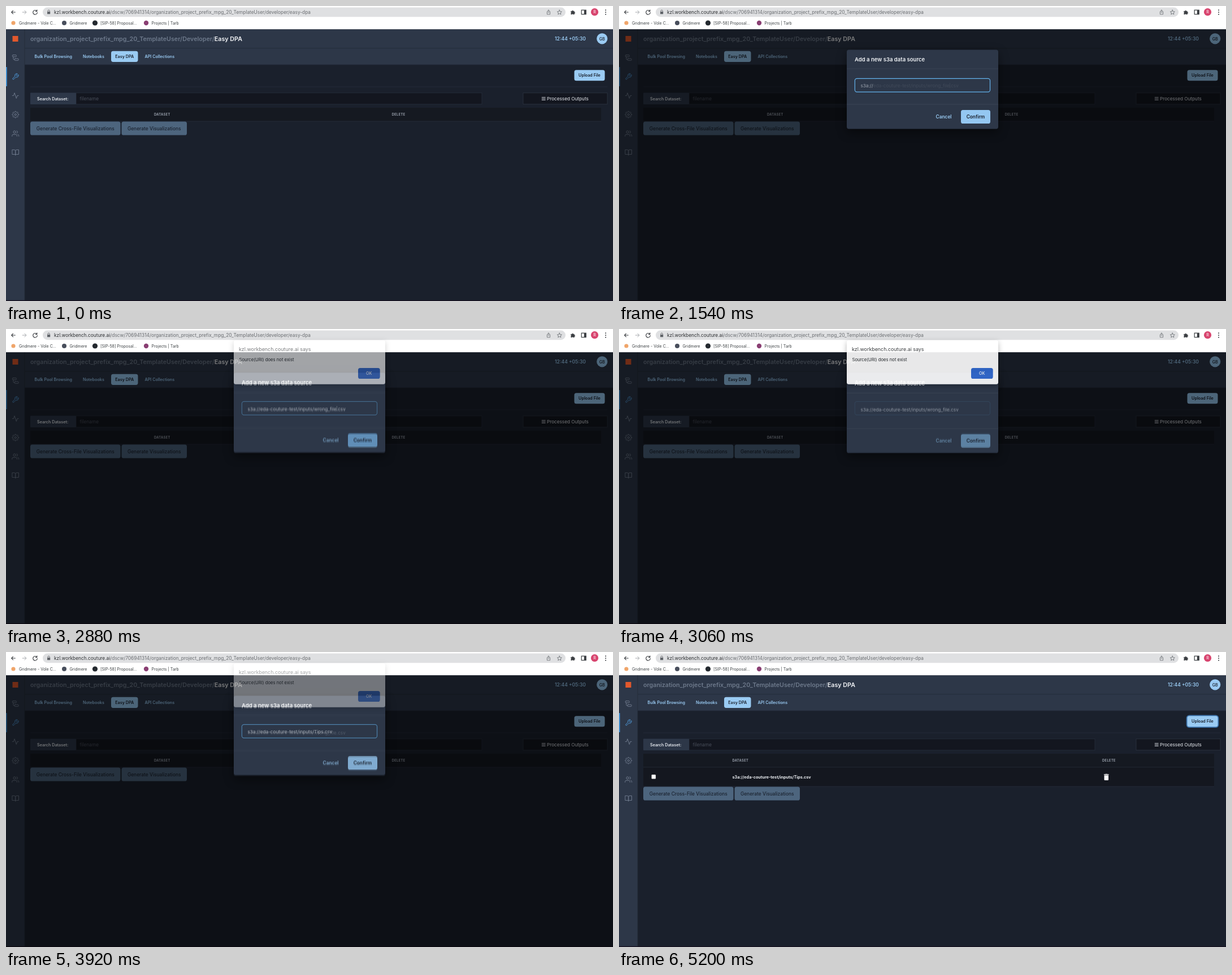
An HTML page that plays this animation: 1074x522 px, repeating every 5.7 s.

```html
<!DOCTYPE html>
<html lang="en">
<head>
<meta charset="utf-8">
<title>Add a data source</title>
<style>
html, body { margin: 0; width: 100%; height: 100%; overflow: hidden; background: #1a202c; }
svg { display: block; width: 100%; height: 100%; }
text { font-family: Inter, Roboto, sans-serif; white-space: pre; }
.shadow { filter: drop-shadow(0 6px 9px rgba(0, 0, 0, .45)); }
.alert { filter: drop-shadow(0 3px 5px rgba(0, 0, 0, .3)); }
</style>
</head>
<body>
<svg id="stage" viewBox="0 0 1074 522" preserveAspectRatio="none"></svg>
<script>
const BLUE = '#9acbf3', INK = '#1a202c', PANEL = '#2d3748', LINE = '#272e3c', FIELD = '#13161f';
const TOP = 41.4, BOTTOM = 520.6;
const HOST = 'kzl.workbench.couture.ai';
const BUCKET = 's3a://eda-couture-test/inputs/';

const rect = (x, y, w, h, fill, more = '') =>
  `<rect x="${x}" y="${y}" width="${w}" height="${h}" fill="${fill}" ${more}/>`;
const circle = (x, y, r, fill, more = '') =>
  `<circle cx="${x}" cy="${y}" r="${r}" fill="${fill}" ${more}/>`;
const hline = (x1, x2, y, color) => rect(x1, y - 0.4, x2 - x1, 0.8, color);
const below = (x, w, fill, more) => rect(x, TOP, w, 522 - TOP, fill, more);

// y is the middle of the capitals
const text = (x, y, size, fill, str, weight = 400, more = '') =>
  `<text x="${x}" y="${y + size * 0.36}" font-size="${size}" font-weight="${weight}" fill="${fill}" ${more}>${str}</text>`;
const centered = (x, y, size, fill, str, weight = 600) =>
  text(x, y, size, fill, str, weight, 'text-anchor="middle"');

// icon drawn on a 24 unit grid around its centre
const icon = (x, y, size, color, d, width = 2, fill = 'none') =>
  `<path transform="translate(${x - size / 2} ${y - size / 2}) scale(${size / 24})" d="${d}" fill="${fill}" ` +
  `stroke="${color}" stroke-width="${width}" stroke-linecap="round" stroke-linejoin="round"/>`;

const button = (x, y, w, h, fill, label, size, ink = INK, weight = 600) =>
  rect(x, y, w, h, fill, 'rx="3.6"') + centered(x + w / 2, y + h / 2, size, ink, label, weight);

function gearPath() {
  let d = '';
  for (let i = 0; i <= 96; i++) {
    const a = i / 96 * 2 * Math.PI;
    const r = 9.3 + 1.6 * Math.tanh(2.2 * Math.cos(8 * a));
    d += `${i ? 'L' : 'M'}${(12 + r * Math.cos(a)).toFixed(2)} ${(12 + r * Math.sin(a)).toFixed(2)}`;
  }
  return d + 'zM15 12a3 3 0 1 1-6 0a3 3 0 1 1 6 0';
}

const ICONS = {
  flow: 'M4 3h9a2 2 0 0 1 2 2v2a2 2 0 0 1-2 2H4a2 2 0 0 1-2-2V5a2 2 0 0 1 2-2zM11 15h9a2 2 0 0 1 2 2v2a2 2 0 0 1-2 2h-9a2 2 0 0 1-2-2v-2a2 2 0 0 1 2-2zM5 9v7a2 2 0 0 0 2 2h2',
  tool: 'M14.7 6.3a1 1 0 0 0 0 1.4l1.6 1.6a1 1 0 0 0 1.4 0l3.77-3.77a6 6 0 0 1-7.94 7.94l-6.91 6.91a2.12 2.12 0 0 1-3-3l6.91-6.91a6 6 0 0 1 7.94-7.94l-3.76 3.76z',
  pulse: 'M22 12h-4l-3 9L9 3l-3 9H2',
  gear: gearPath(),
  users: 'M17 21v-2a4 4 0 0 0-4-4H5a4 4 0 0 0-4 4v2M23 21v-2a4 4 0 0 0-3-3.87M16 3.13a4 4 0 0 1 0 7.75M13 7a4 4 0 1 1-8 0a4 4 0 1 1 8 0',
  book: 'M2 3h6a4 4 0 0 1 4 4v14a3 3 0 0 0-3-3H2zM22 3h-6a4 4 0 0 0-4 4v14a3 3 0 0 1 3-3h7z',
  arrow: 'M20 12H4M11 5l-7 7 7 7',
  reload: 'M19 7a9 9 0 1 0 2 6M20 2v6h-6',
  share: 'M8 9H5v13h14V9h-3M12 15V2M8 5l4-4 4 4',
  star: 'M12 2l3 6.9 7.2.7-5.4 4.9 1.6 7.2L12 18l-6.4 3.7 1.6-7.2-5.4-4.9 7.2-.7z',
  puzzle: 'M3 7h5a3 3 0 1 1 6 0h5v5a3 3 0 1 1 0 6v4h-6a3 3 0 0 0-5 0H3v-5a3 3 0 0 0 0-5z',
  trash: 'M6 19a2 2 0 0 0 2 2h8a2 2 0 0 0 2-2V7H6zM19 4h-3.5l-1-1h-5l-1 1H5v2h14z',
  menu: 'M3 5h18M3 12h18M3 19h18'
};

function browserBar() {
  const dark = '#3b3e42', grey = '#5f6368';
  const path = '/dscw/706941314/organization_project_prefix_mpg_20_TemplateUser/developer/easy-dpa';
  const marks = [
    [23, 'Gridmere - Vole C...'], [112.5, 'Gridmere'], [167, '[SIP-58] Proposal...'], [257.5, 'Projects | Tarb']
  ];
  return rect(0, 0, 1074, 44, '#fff') +
    icon(13, 11, 10, dark, ICONS.arrow, 2.6) +
    `<g transform="rotate(180 32.5 11)">${icon(32.5, 11, 10, '#a6a9ad', ICONS.arrow, 2.4)}</g>` +
    icon(51.5, 11, 10, dark, ICONS.reload, 2.8) +
    rect(65, 2.5, 925, 16.7, '#dfe0e2', 'rx="8.3"') +
    rect(73, 10, 5.2, 4.3, grey, 'rx=".6"') +
    `<path d="M74 10V8.7a1.6 1.6 0 0 1 3.2 0V10" fill="none" stroke="${grey}" stroke-width=".9"/>` +
    text(85, 11, 8.33, '#6a6d71', `<tspan fill="#2a2c2f">${HOST}</tspan>${path}`) +
    icon(960, 11, 9, grey, ICONS.share, 2) +
    icon(979.3, 11, 9.5, grey, ICONS.star, 2) +
    icon(1003, 11, 9, dark, ICONS.puzzle, 1, dark) +
    rect(1018.2, 7.2, 8, 7.4, 'none', `stroke="${dark}" stroke-width="1.2"`) + rect(1022.8, 7.2, 3.5, 7.4, dark) +
    circle(1041.5, 10.7, 6.6, '#d8456f') + centered(1041.5, 10.7, 7, '#fff', 'R', 400) +
    [7.3, 11, 14.7].map(y => circle(1061, y, 1, dark)).join('') +
    circle(13, 30, 3.6, '#f0a56a') + circle(103, 30, 4, '#484e5c') +
    circle(157.5, 30, 4.6, '#24292f') + circle(248, 30, 4.2, '#8a3f73') +
    marks.map(([x, s]) => text(x, 30, 7.05, '#3c4043', s)).join('');
}

function sidebar() {
  return below(0, 33, PANEL) +
    rect(11.5, 53, 10, 10, '#e2582c') +
    rect(0, 108, 1.7, 34, '#4299e1') +
    ['flow', 'tool', 'pulse', 'gear', 'users', 'book'].map((name, i) =>
      icon(16.7, 91.5 + 33.55 * i, 13, name === 'tool' ? '#4f9bdc' : '#707b8d', ICONS[name], 1.8)).join('') +
    below(32.6, 0.8, '#232b39');
}

function page(listed) {
  const top = listed ? 238.5 : 204.5;
  const th = (x, s) => text(x, 192, 5.8, '#a9b1bd', s, 600, 'letter-spacing=".35"');
  const row = listed
    ? rect(43, 204, 1010, 34, '#14171f') + hline(43, 1053, 204, '#20262f') + hline(43, 1053, 238, LINE) +
      rect(57.6, 217, 7.4, 7.4, '#fff', 'rx="1.2" stroke="#777" stroke-width=".4"') +
      text(200.5, 221.5, 7.2, '#edf0f4', BUCKET + 'Tips.csv', 700) +
      icon(862.3, 221.3, 15, 'none', ICONS.trash, 0, '#fff')
    : '';
  const ring = listed ? rect(1005.5, 113.2, 54, 19.1, BLUE, 'rx="3.6" stroke="#3a70a8" stroke-width="3.6"') : '';
  return below(0, 1074, INK) +
    rect(33, TOP, 1041, 104 - TOP, PANEL) + hline(33, 1074, 74.8, '#222a38') + hline(33, 1074, 104, '#202735') +
    sidebar() +
    text(43, 58, 10.72, '#6d798b',
      'organization_project_prefix_mpg_20_TemplateUser/Developer/<tspan fill="#f3f5f8">Easy DPA</tspan>', 600) +
    text(971, 58, 8.45, BLUE, '12:44 +05:30', 600) +
    circle(1054.7, 57.8, 9.6, BLUE) + centered(1054.7, 58, 7.1, INK, 'GB', 500) +
    text(50.5, 89.7, 7.2, BLUE, 'Bulk Pool Browsing', 600) +
    text(136, 89.7, 7.2, BLUE, 'Notebooks', 600) +
    button(186, 79.8, 47.5, 19.1, BLUE, 'Easy DPA', 7.2) +
    text(245.5, 89.7, 7.2, BLUE, 'API Collections', 600) +
    ring + button(1005.5, 113.2, 54, 19.1, BLUE, 'Upload File', 7.2) +
    hline(43, 1064, 143, LINE) +
    rect(124, 153.8, 718, 20, FIELD, `stroke="${LINE}" stroke-width=".8"`) +
    rect(43, 153.4, 81, 20.6, PANEL, 'rx="1"') +
    text(55, 164, 7.2, '#e8ecf1', 'Search Dataset:', 600) +
    text(130.5, 164, 8.3, '#474d59', 'filename') +
    rect(915, 153.8, 149, 20, FIELD, 'stroke="#2d3543" stroke-width=".8"') +
    icon(951.2, 164, 8, '#e8ecf1', ICONS.menu, 2.6) +
    text(957, 164, 8.2, '#e8ecf1', 'Processed Outputs') +
    rect(43, 180, 1010, 24, '#151921') + hline(43, 1053, 204, LINE) +
    th(listed ? 200.5 : 262, 'DATASET') + th(listed ? 855 : 682.7, 'DELETE') +
    row +
    button(43, top, 159.5, 24, '#4d657e', 'Generate Cross-File Visualizations', 8.4, '#1b2330', 500) +
    button(204.5, top, 115.5, 24, '#4d657e', 'Generate Visualizations', 8.4, '#1b2330', 500) +
    rect(0, BOTTOM, 1074, 522 - BOTTOM, '#181222');
}

function dialog({ value, ink = '#e3e7ec', confirm = BLUE, busy = false, caret = false }) {
  const edge = busy ? '' : 'stroke="#63b3ed" stroke-width="1.2"';
  return below(0, 1074, '#000', 'opacity=".5"') +
    `<g transform="translate(0 ${busy ? 2.2 : 0})">` +
    rect(403, 77.6, 268, 139.8, PANEL, 'rx="3.6" class="shadow"') +
    text(417, 94.3, 9.54, '#f1f4f7', 'Add a new s3a data source', 600) +
    hline(403, 671, 111, '#3d4757') + hline(403, 671, 174, '#3d4757') +
    rect(417.35, 128.3, 239.2, 23.9, PANEL, `rx="3.6" ${edge}`) +
    text(427.5, 140.7, 8.18, ink, value) +
    (caret ? rect(584.9, 136.3, 0.8, 9, '#e3e7ec') : '') +
    centered(574.5, 196, 8.35, busy ? '#5f819f' : BLUE, 'Cancel') +
    button(605, 184, 52, 24, confirm, 'Confirm', 8.35) +
    '</g>';
}

const alertBox = () =>
  rect(403, 20, 268, 77.8, '#fff', 'rx="3.5" class="alert"') +
  text(412, 36, 8.9, '#25282b', `${HOST} says`) +
  text(412.5, 54, 7.7, '#25282b', 'Source(URI) does not exist') +
  button(623, 69, 38.7, 19, '#326bd3', 'OK', 7.2, '#fff', 500);

const wrong = BUCKET + 'wrong_file.csv';
const scenes = [
  page(false),
  page(false) + dialog({ value: 's3a://', ink: '#949ca8' }),
  page(false) + dialog({ value: wrong, confirm: '#69a9e2', caret: true }),
  page(false) + dialog({ value: wrong, ink: '#8b939f', confirm: '#5b7d9c', busy: true }) + alertBox(),
  page(false) + dialog({ value: BUCKET + 'Tips.csv' }),
  page(true)
];

const stage = document.getElementById('stage');
const bar = browserBar();
stage.innerHTML = scenes.map(s => `<g>${bar}${s}</g>`).join('');
const layers = [...stage.children];

const LOOP = 5700, HOLD = 500, STEP = 60, STEPS = 10;
const SPAN = HOLD + STEP * (STEPS - 1);

// each scene holds, then the next one dissolves over it in even steps
function draw(time) {
  const t = time % LOOP;
  const current = Math.floor(t / SPAN);
  const since = t % SPAN - HOLD;
  const mix = since < 0 ? 0 : (Math.floor(since / STEP) + 1) / STEPS;
  layers.forEach((layer, i) => {
    const opacity = i === current ? 1 : i === current + 1 ? mix : 0;
    layer.style.display = opacity ? '' : 'none';
    layer.style.opacity = opacity;
  });
}

const start = performance.now();
function tick() {
  draw(performance.now() - start);
  requestAnimationFrame(tick);
}
tick();
</script>
</body>
</html>
```
